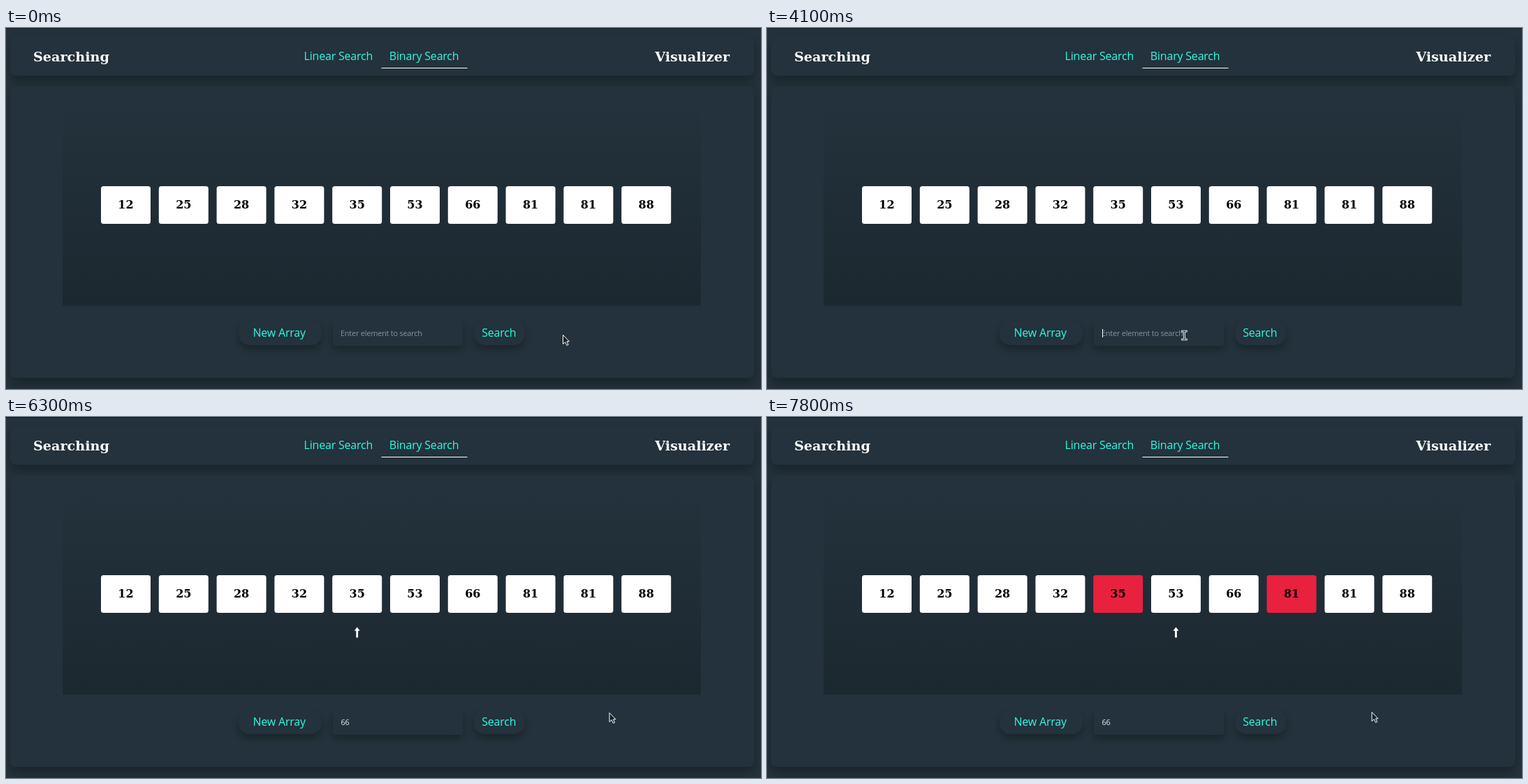
These frames come from a looping animation (1081x518 px, 8000 ms). An HTML page with a canvas:

```html
<!DOCTYPE html>
<html lang="en">
<head>
<meta charset="utf-8">
<title>Searching Visualizer</title>
<style>
  html, body { margin: 0; width: 100%; height: 100%; overflow: hidden; background: #23323c; }
  canvas { display: block; }
</style>
</head>
<body>
<canvas id="stage" width="1081" height="518"></canvas>
<script>
const ctx = document.getElementById('stage').getContext('2d');
const LOOP = 8000;
const PAGE = '#23323c', TEAL = '#2dfbe0', RED = '#e8213f';
const SANS = '"Open Sans", "Noto Sans", sans-serif';
const SERIF = '"DejaVu Serif", serif';
const VALUES = [12, 25, 28, 32, 35, 53, 66, 81, 81, 88];
const BOX = { x: 136, y: 227, w: 71, h: 54, pitch: 82.8 };

// Each row starts at its time and holds until the next one.
const POINTER = [
  [0, 797.5, 440, 'arrow'],
  [800, 783, 440, 'arrow'],
  [900, 722, 438, 'arrow'],
  [1000, 646, 441, 'beam'],
  [1100, 615, 441, 'beam'],
  [1200, 602, 441, 'beam'],
  [1300, 597.5, 441, 'beam'],
  [5200, 604.5, 444, 'beam'],
  [5300, 645.5, 448, 'beam'],
  [5500, 686, 440, 'arrow'],
  [5600, 709, 437, 'arrow'],
  [6000, 748, 433, 'arrow'],
  [6100, 812, 428, 'arrow'],
  [6200, 852, 425, 'arrow'],
  [6300, 864, 424, 'arrow'],
  [6400, 866, 423, 'arrow']
];
const TYPED = [[0, ''], [4700, '6'], [4900, '66']];
const CARET = [[0, false], [1800, true], [2900, false], [4100, true], [5300, false]];
const PROBE = [[0, -1], [6000, 4], [6800, 7], [7800, 5]];
const REJECTED = { 4: 6400, 7: 7300 };

const at = (rows, t) => rows.filter(row => row[0] <= t).pop().slice(1);

function roundRect(x, y, w, h, r, fill) {
  ctx.beginPath();
  ctx.roundRect(x, y, w, h, r);
  ctx.fillStyle = fill;
  ctx.fill();
}

function raised(x, y, w, h, r, drop, blur, alpha) {
  ctx.save();
  ctx.shadowColor = `rgba(0,0,0,${alpha})`;
  ctx.shadowOffsetY = drop;
  ctx.shadowBlur = blur;
  roundRect(x, y, w, h, r, PAGE);
  ctx.restore();
}

function label(str, x, y, font, color, spacing = 0, align = 'left') {
  ctx.font = font;
  ctx.fillStyle = color;
  ctx.textAlign = align;
  ctx.letterSpacing = spacing + 'px';
  ctx.fillText(str, x, y);
}

function drawHeader() {
  raised(6, 12, 1065, 56.5, 8, 8, 16, 0.3);
  const title = `bold 19.2px ${SERIF}`;
  label('Searching', 39, 47.5, title, '#fff');
  label('Visualizer', 1036, 47.5, title, '#fff', 0, 'right');
  label('Linear Search', 426.6, 46, `16px ${SANS}`, TEAL, -0.2);
  label('Binary Search', 548.8, 46, `16px ${SANS}`, TEAL, -0.2);
  ctx.fillStyle = '#fff';
  ctx.fillRect(537.5, 57, 123, 1);
}

function drawPanel() {
  raised(6, 84, 1065, 418, 8, 8, 16, 0.3);
  const shade = ctx.createLinearGradient(0, 108, 0, 398);
  shade.addColorStop(0, PAGE);
  shade.addColorStop(1, '#1c2830');
  ctx.fillStyle = shade;
  ctx.fillRect(81, 108, 914, 290.5);
}

function drawBoxes(t) {
  VALUES.forEach((value, i) => {
    const x = BOX.x + i * BOX.pitch;
    roundRect(x, BOX.y, BOX.w, BOX.h, 3.5, t >= REJECTED[i] ? RED : '#fff');
    label(value, x + BOX.w / 2, 259, `bold 16px ${SERIF}`, '#000', 0, 'center');
  });
}

function drawProbe(t) {
  const [i] = at(PROBE, t);
  if (i < 0) return;
  const x = BOX.x + i * BOX.pitch + BOX.w / 2;
  ctx.fillStyle = '#fff';
  ctx.beginPath();
  ctx.moveTo(x, 301.5);
  ctx.lineTo(x + 4, 306.8);
  ctx.lineTo(x - 4, 306.8);
  ctx.fill();
  ctx.fillRect(x - 1.4, 306, 2.8, 10.5);
}

function drawControls(t) {
  raised(333, 420, 119, 35, 15, 6, 12, 0.28);
  raised(468, 420, 186, 36, 3, 6, 12, 0.28);
  raised(670, 420, 73, 35, 15, 6, 12, 0.28);
  label('New Array', 353.5, 443, `16px ${SANS}`, TEAL, -0.2);
  label('Search', 681.2, 443, `16px ${SANS}`, TEAL, -0.2);

  const [typed] = at(TYPED, t);
  const font = `11px ${SANS}`;
  if (typed) label(typed, 479.4, 442, font, '#eceeef', -0.25);
  else label('Enter element to search', 479, 442, font, '#8b949b', -0.25);
  if (at(CARET, t)[0]) {
    ctx.fillStyle = '#fff';
    ctx.fillRect(480 + typed.length * 6, 432, 1, 12);
  }
}

function drawPointer(t) {
  const [x, y, kind] = at(POINTER, t);
  ctx.save();
  ctx.translate(x, y);
  ctx.lineJoin = 'round';
  if (kind === 'arrow') {
    const shape = new Path2D('M0 .5V13.5L3.2 10.6 5.4 15.4 7.6 14.4 5.5 9.8H9Z');
    ctx.fillStyle = '#182127';
    ctx.strokeStyle = '#fff';
    ctx.fill(shape);
    ctx.stroke(shape);
  } else {
    const shape = new Path2D('M-2.8 -5.8H2.8M0 -5.8V5.8M-2.8 5.8H2.8');
    ctx.lineCap = 'square';
    for (const [color, width] of [['#fff', 2.8], ['#182127', 1]]) {
      ctx.strokeStyle = color;
      ctx.lineWidth = width;
      ctx.stroke(shape);
    }
  }
  ctx.restore();
}

function draw(t) {
  ctx.fillStyle = PAGE;
  ctx.fillRect(0, 0, 1081, 518);
  drawHeader();
  drawPanel();
  drawBoxes(t);
  drawProbe(t);
  drawControls(t);
  ctx.fillStyle = '#121a21';
  ctx.fillRect(0, 0, 1081, 1);
  drawPointer(t);
}

const start = performance.now();
function tick() {
  draw((performance.now() - start) % LOOP);
  requestAnimationFrame(tick);
}
tick();
</script>
</body>
</html>
```
